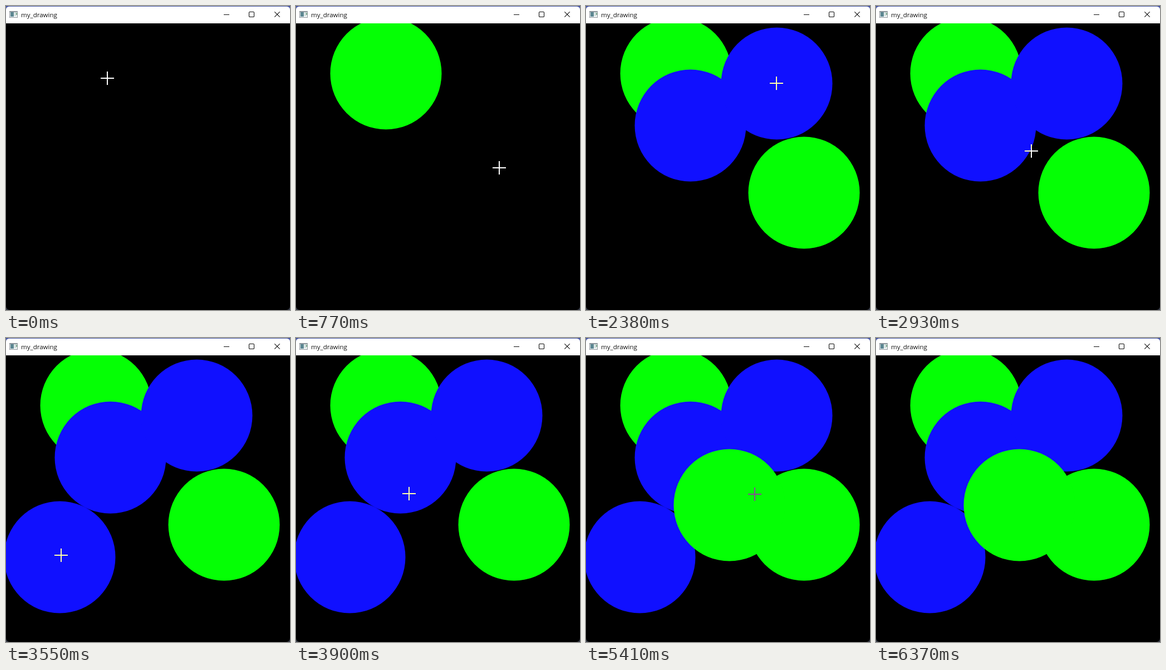
Animation, 510 px wide and 543 px high, one loop 6440 ms. Source, as an HTML page with a canvas:

```html
<!DOCTYPE html>
<html lang="en">
<head>
<meta charset="utf-8">
<title>my_drawing</title>
<style>
  html, body { margin: 0; width: 100%; height: 100%; overflow: hidden; background: #383c48; }
  #window {
    position: absolute; left: 0; top: 0; width: 510px; height: 543px;
    overflow: hidden; border-radius: 0 0 7px 7px; background: #000;
  }
  canvas, svg { position: absolute; left: 0; top: 0; display: block; }
  text { font: 11.5px "Open Sans", "Noto Sans", sans-serif; fill: #111; }
</style>
</head>
<body>
<div id="window">
  <canvas id="drawing" width="510" height="543"></canvas>
  <svg width="510" height="31" viewBox="0 0 510 31">
    <rect width="510" height="31" fill="#4656a4"/>
    <path d="M0 31V7Q0 1 6 1H504Q510 1 510 7V31Z" fill="#fff"/>
    <g shape-rendering="crispEdges">
      <rect x="6" y="9" width="15" height="12" fill="#8e969c"/>
      <rect x="7" y="11" width="13" height="9" fill="#f2f5f6"/>
      <rect x="8" y="11" width="6" height="8" fill="#5c8792"/>
      <rect x="15" y="11" width="3" height="7" fill="#cfdfdc"/>
      <rect x="18" y="12" width="2" height="4" fill="#86b094"/>
    </g>
    <text x="27" y="20">my_drawing</text>
    <g fill="none" stroke="#111" stroke-width="1.1">
      <path d="M391 15.5H401M482.3 10.3L491.7 19.7M491.7 10.3L482.3 19.7"/>
      <rect x="436.5" y="10.5" width="9" height="9" rx="1.3"/>
    </g>
  </svg>
</div>
<script>
const ctx = document.getElementById('drawing').getContext('2d');
const LOOP = 6440, RADIUS = 100, ARM = 12;
const REST = 140; // pause before and after each click

const green = { fill: '#05ff05', cursor: '#8a4c96' };
const blue = { fill: '#1010ff', cursor: '#ffffa8' };

// Each click stamps a circle; "via" is where the pointer passes on its way there.
const entry = { at: -REST, x: 182, y: 129 };
const circles = [
  { at: 350, x: 161, y: 120, ink: green },
  { at: 1120, x: 391, y: 333, ink: green, via: { at: 770, x: 365, y: 289 } },
  { at: 1820, x: 187, y: 213, ink: blue },
  { at: 2380, x: 342, y: 138, ink: blue },
  { at: 3340, x: 96, y: 391, ink: blue, via: { at: 2930, x: 280, y: 258 } },
  { at: 5000, x: 257, y: 298, ink: green, via: { at: 3900, x: 203, y: 278 } }
];
const exit = { at: 6230, x: 540, y: 180 };
const stops = [entry, ...circles, exit];

const mix = (a, b, u) => a + (b - a) * u;
const blend = (a, b, u) => ({ x: mix(a.x, b.x, u), y: mix(a.y, b.y, u) });

// Speeds up from one stop to the midway point, then slows into the next stop.
function pointer(t) {
  const next = stops.findIndex(s => t < s.at + REST);
  if (next < 0) return exit;
  const from = stops[next - 1], to = stops[next];
  const leave = from.at + REST, arrive = to.at - REST;
  if (t >= arrive) return to;
  const via = to.via ?? { at: (leave + arrive) / 2, ...blend(from, to, 0.5) };
  if (t < via.at) return blend(from, via, ((t - leave) / (via.at - leave)) ** 2);
  return blend(to, via, ((arrive - t) / (arrive - via.at)) ** 2);
}

function trace({ x, y }) {
  ctx.beginPath();
  ctx.arc(x + 0.5, y + 0.5, RADIUS, 0, Math.PI * 2);
}

function cross({ x, y }, color) {
  const cx = Math.round(x), cy = Math.round(y);
  ctx.fillStyle = color;
  ctx.fillRect(cx - ARM, cy - 1, ARM * 2, 2);
  ctx.fillRect(cx - 1, cy - ARM, 2, ARM * 2);
}

function draw(t) {
  ctx.clearRect(0, 0, 510, 543);
  const visible = circles.filter(c => c.at <= t);
  for (const c of visible) {
    trace(c);
    ctx.fillStyle = c.ink.fill;
    ctx.fill();
  }
  // The pointer contrasts with whatever lies under it.
  const position = pointer(t);
  cross(position, '#fff');
  for (const c of visible) {
    ctx.save();
    trace(c);
    ctx.clip();
    cross(position, c.ink.cursor);
    ctx.restore();
  }
}

const start = performance.now();
function tick() {
  draw((performance.now() - start) % LOOP);
  requestAnimationFrame(tick);
}
tick();
</script>
</body>
</html>
```
